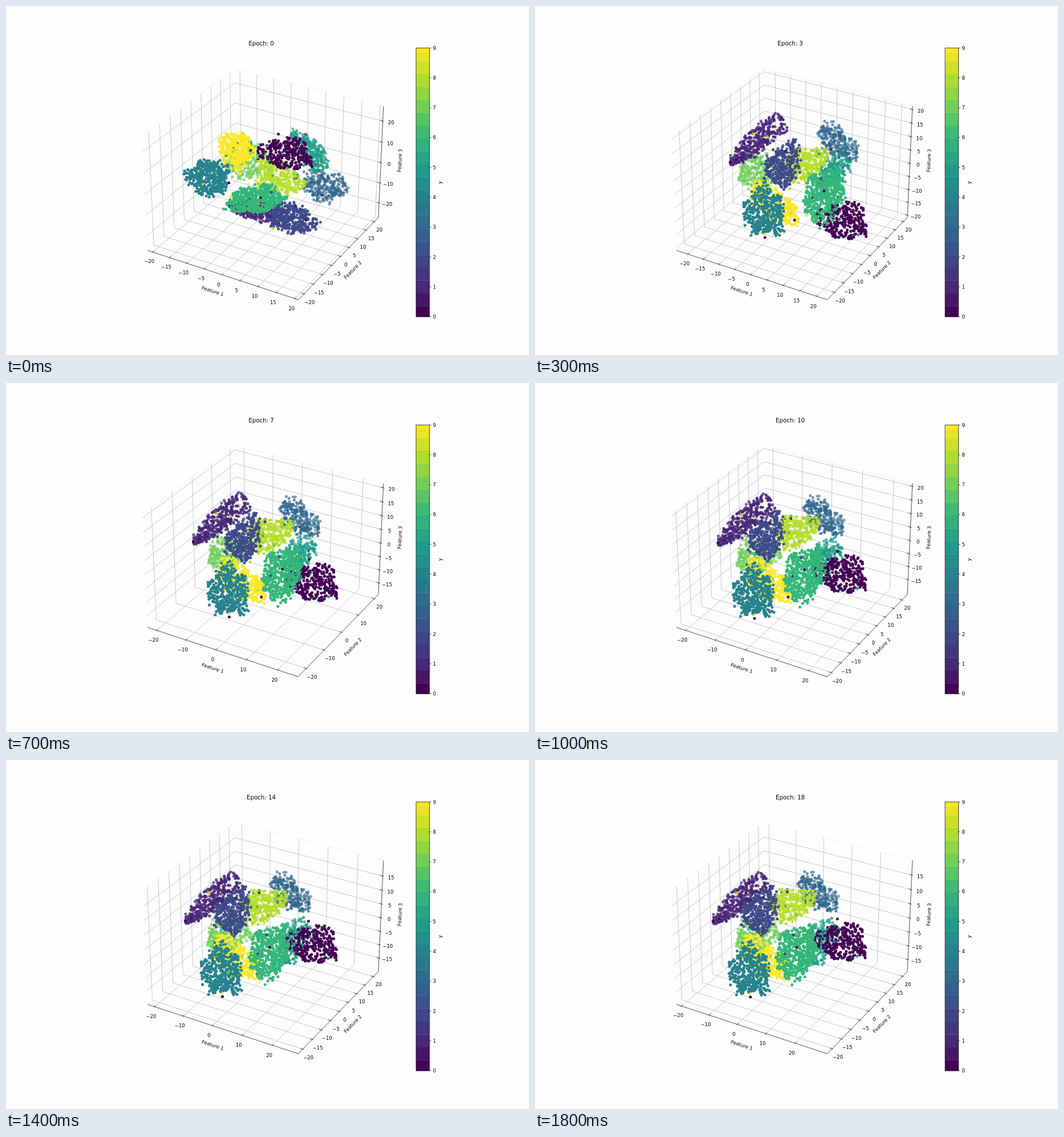
Recreate the animation shown at these times as an HTML page with a canvas. Size 917 by 611 pixels, loop 1900 ms.

```html
<!DOCTYPE html>
<html lang="en">
<head>
<meta charset="utf-8">
<title>Feature space by epoch</title>
<style>
html, body { margin: 0; width: 100%; height: 100%; overflow: hidden; background: #fdfdfd; }
canvas, svg { position: absolute; left: 0; top: 0; width: 917px; height: 611px; }
text { font: 8.5px "DejaVu Sans", sans-serif; text-anchor: middle; fill: #000; }
#title { font-size: 10.19px; }
#bar text { text-anchor: start; }
</style>
</head>
<body>
<canvas id="plot" width="917" height="611"></canvas>
<svg viewBox="0 0 917 611">
  <text id="title" x="447.5" y="68.7"></text>
  <g id="ticks"></g>
  <text transform="translate(362.5 499) rotate(18)" y="3">Feature 1</text>
  <text transform="translate(608 462) rotate(-45.6)" y="3">Feature 2</text>
  <text transform="translate(690.5 270.5) rotate(-87.4)" y="3">Feature 3</text>
  <g id="bar"></g>
  <text transform="translate(762 309) rotate(-90)" y="2">y</text>
</svg>
<script>
const $ = id => document.getElementById(id);
const ctx = $('plot').getContext('2d');
const STEP = 100, LAST = 18, SETTLED = 2;
const PALETTE = ['#440154', '#482878', '#3e4a89', '#31688e', '#26828e',
  '#1f9e89', '#35b779', '#6ece58', '#b5de2b', '#fde725'];

const lerp = (a, b, k) => a + (b - a) * k;
const mix = (a, b, k) => a.map((v, i) => lerp(v, b[i], k));
const easeOut = t => t * (2 - t);

let seed = 20;
function rand() {
  seed = (seed + 0x6D2B79F5) | 0;
  let t = Math.imul(seed ^ (seed >>> 15), 1 | seed);
  t = (t + Math.imul(t ^ (t >>> 7), 61 | t)) ^ t;
  return ((t ^ (t >>> 14)) >>> 0) / 4294967296;
}
const spread = () => rand() + rand() + rand() - 1.5;

// Camera: elevation 30, azimuth -60, distance 10
const H = 0.5952, Z = 0.4464;
function project(x, y, z) {
  const k = 2545 / (10 - 0.433 * x + 0.75 * y - 0.5 * z);
  return [454.2 + k * (0.866 * x + 0.5 * y), 302.2 - k * (-0.25 * x + 0.433 * y + 0.866 * z)];
}

// Middle and half width of the data range at a few epochs
const RANGE_KEYS = [0, SETTLED, 7, 10, LAST];
const OUT = 0.0095, IN = 0.019, PAD = 0.043;
const axes = [
  {
    mid: [-0.31, -0.77, 1.62, 1.35, 4.45],
    half: [20.36, 22.16, 23.84, 23.49, 25.28],
    size: 0.5714,
    grid: q => [[q, -H, -Z], [q, H, -Z], [q, H, Z]],
    tick: q => [[q, -H - OUT, -Z], [q, -H + IN, -Z]],
    label: q => [q, -H - PAD, -Z - 0.75 * PAD]
  },
  {
    mid: [-0.19, -0.55, -0.82, 0.6, 0.21],
    half: [21.9, 22.18, 22.58, 21.8, 21.85],
    size: 0.5714,
    grid: q => [[H, q, -Z], [-H, q, -Z], [-H, q, Z]],
    tick: q => [[H + OUT, q, -Z], [H - IN, q, -Z]],
    label: q => [H + PAD, q, -Z - 0.75 * PAD]
  },
  {
    mid: [-0.19, -0.13, 1.12, 0.14, 0.35],
    half: [26.05, 20.3, 19.65, 20.09, 18.9],
    size: 0.4286,
    grid: q => [[-H, -H, q], [-H, H, q], [H, H, q]],
    tick: q => [[H + OUT, H, q], [H - IN, H, q]],
    label: q => [H + PAD, H + PAD, q]
  }
];

function at(values, epoch) {
  let i = 0;
  while (epoch > RANGE_KEYS[i + 1]) i++;
  const [a, b] = RANGE_KEYS.slice(i);
  return lerp(values[i], values[i + 1], (epoch - a) / (b - a));
}

function line(points, color) {
  ctx.beginPath();
  points.forEach(p => ctx.lineTo(...project(...p)));
  ctx.strokeStyle = color;
  ctx.lineWidth = 0.7;
  ctx.stroke();
}

function drawAxes(epoch) {
  line([[-H, -H, Z], [-H, H, Z], [H, H, Z]], '#f0f0f0');
  const marks = [];
  let labels = '';
  for (const axis of axes) {
    const mid = at(axis.mid, epoch), half = at(axis.half, epoch);
    const step = half > 22.5 ? 10 : 5;
    for (let v = Math.ceil((mid - half) / step) * step; v <= mid + half; v += step) {
      const q = (v - mid) / half * axis.size;
      line(axis.grid(q), '#b0b0b0');
      marks.push(axis.tick(q));
      const [x, y] = project(...axis.label(q));
      const name = (v < 0 ? '\u2212' : '') + Math.abs(v);
      labels += `<text x="${x.toFixed(2)}" y="${(y + 7.6).toFixed(2)}">${name}</text>`;
    }
  }
  line([[-H, -H, -Z], [H, -H, -Z], [H, H, -Z], [H, H, Z]], '#000');
  marks.forEach(m => line(m, '#000'));
  $('ticks').innerHTML = labels;
}

// A cloud jumps from its first ellipse to a settled one, which then drifts.
// shape: [rx, ry, degrees]; taper widens one end
const clouds = [];
const cloud = (count, depth, first, second, taper = 0) =>
  clouds.push({ count, depth, first, second, taper });
const ellipse = (from, shape, to = from) => ({ from, shape, to });

cloud(310, 0.84, ellipse([492, 258], [44, 28, 15]), ellipse([541, 383], [42, 34, 20], [539, 318]));
cloud(370, 0.52, ellipse([437, 357], [50, 17, 10]), ellipse([392, 236], [64, 19, -41], [358, 246]), 0.55);
cloud(350, 0.70, ellipse([502, 372], [42, 25, 20]), ellipse([441, 280], [41, 28, -60], [396, 265]));
cloud(300, 0.27, ellipse([558, 315], [38, 26, 10]), ellipse([535, 240], [41, 23, 42], [495, 233]));
cloud(430, 0.95, ellipse([354, 301], [37, 31, 0]), ellipse([405, 357], [45, 35, 80], [376, 368]));
cloud(280, 0.42, ellipse([533, 254], [45, 18, 48]), ellipse([525, 292], [44, 22, -65], [502, 318]));
cloud(490, 0.90, ellipse([437, 338], [50, 23, -8]), ellipse([513, 332], [49, 34, -72], [458, 337]));
cloud(290, 0.30, ellipse([425, 268], [38, 36, 0]), ellipse([393, 284], [38, 30, -20], [388, 308]));
cloud(320, 0.58, ellipse([478, 300], [43, 29, 20]), ellipse([475, 278], [40, 28, -20], [450, 252]));
cloud(320, 0.74, ellipse([403, 253], [27, 33, 0]), ellipse([420, 347], [48, 27, 38], [402, 347]));

// Uneven outlines; a few dots of every group stray into another cloud
function makeDot(group) {
  const stray = rand() < 0.025;
  const home = clouds[stray ? Math.floor(rand() * clouds.length) : group];
  const a = rand() * 2 * Math.PI;
  const edge = 1 + 0.11 * Math.sin(3 * a + group) + 0.09 * Math.sin(5 * a - 2 * group);
  const r = Math.sqrt(rand()) * edge;
  const u = r * Math.cos(a);
  return {
    home, u,
    v: r * Math.sin(a) * (1 + home.taper * u),
    color: PALETTE[group],
    dx: spread() * 5, dy: spread() * 5,
    depth: home.depth + spread() * 0.16
  };
}
const dots = clouds
  .flatMap((c, group) => Array.from({ length: c.count }, () => makeDot(group)))
  .sort((a, b) => a.depth - b.depth);

function place(c, epoch) {
  const jump = Math.min(1, epoch / SETTLED);
  const drift = easeOut(Math.max(0, (epoch - SETTLED) / (LAST - SETTLED)));
  const [x, y] = mix(c.first.from, mix(c.second.from, c.second.to, drift), jump);
  const [rx, ry, deg] = mix(c.first.shape, c.second.shape, jump);
  const a = deg * Math.PI / 180;
  Object.assign(c, { x, y, rx, ry, cos: Math.cos(a), sin: Math.sin(a) });
}

function drawDots(epoch) {
  clouds.forEach(c => place(c, epoch));
  ctx.lineWidth = 1.25;
  for (const d of dots) {
    const c = d.home, u = d.u * c.rx, v = d.v * c.ry;
    ctx.globalAlpha = Math.min(1, 0.38 + 0.75 * d.depth);
    ctx.fillStyle = ctx.strokeStyle = d.color;
    ctx.beginPath();
    ctx.arc(c.x + u * c.cos - v * c.sin + d.dx, c.y + u * c.sin + v * c.cos + d.dy, 1.9, 0, 7);
    ctx.fill();
    ctx.stroke();
  }
  ctx.globalAlpha = 1;
}

function shade(t) {
  const i = Math.min(8, Math.floor(t * 9));
  const rgb = color => [1, 3, 5].map(n => parseInt(color.slice(n, n + 2), 16));
  return `rgb(${mix(rgb(PALETTE[i]), rgb(PALETTE[i + 1]), t * 9 - i).map(Math.round)})`;
}

function buildBar() {
  const top = 73.5, bottom = 544, bands = 20;
  const edges = [bottom];
  for (let i = 0; i < bands; i++) edges.push(525.5 - 22.6 * i);
  edges.push(81.5, top);
  let out = '';
  for (let i = 0; i <= bands + 1; i++) {
    const low = edges[i], high = edges[i + 1];
    const t = i > bands ? 1 : i && (bottom - (low + high) / 2) / (bottom - top);
    out += `<rect x="719" y="${high}" width="23.5" height="${low - high + 0.3}" fill="${shade(t)}"/>`;
  }
  out += `<rect x="719" y="${top}" width="23.5" height="${bottom - top}" fill="none" stroke="#000" stroke-width=".7"/>`;
  for (let n = 0; n < 10; n++) {
    const y = lerp(bottom, top, n / 9);
    out += `<path d="M742.5 ${y}h3" stroke="#000" stroke-width=".7"/><text x="748.5" y="${y + 3.1}">${n}</text>`;
  }
  $('bar').innerHTML = out;
}

function draw(epoch) {
  ctx.clearRect(0, 0, 917, 611);
  drawAxes(epoch);
  drawDots(epoch);
  $('title').textContent = 'Epoch: ' + epoch;
}

const start = performance.now();
let shown = -1;
function tick() {
  const epoch = Math.floor((performance.now() - start) / STEP) % (LAST + 1);
  if (epoch !== shown) draw(shown = epoch);
  requestAnimationFrame(tick);
}
buildBar();
tick();
</script>
</body>
</html>
```
